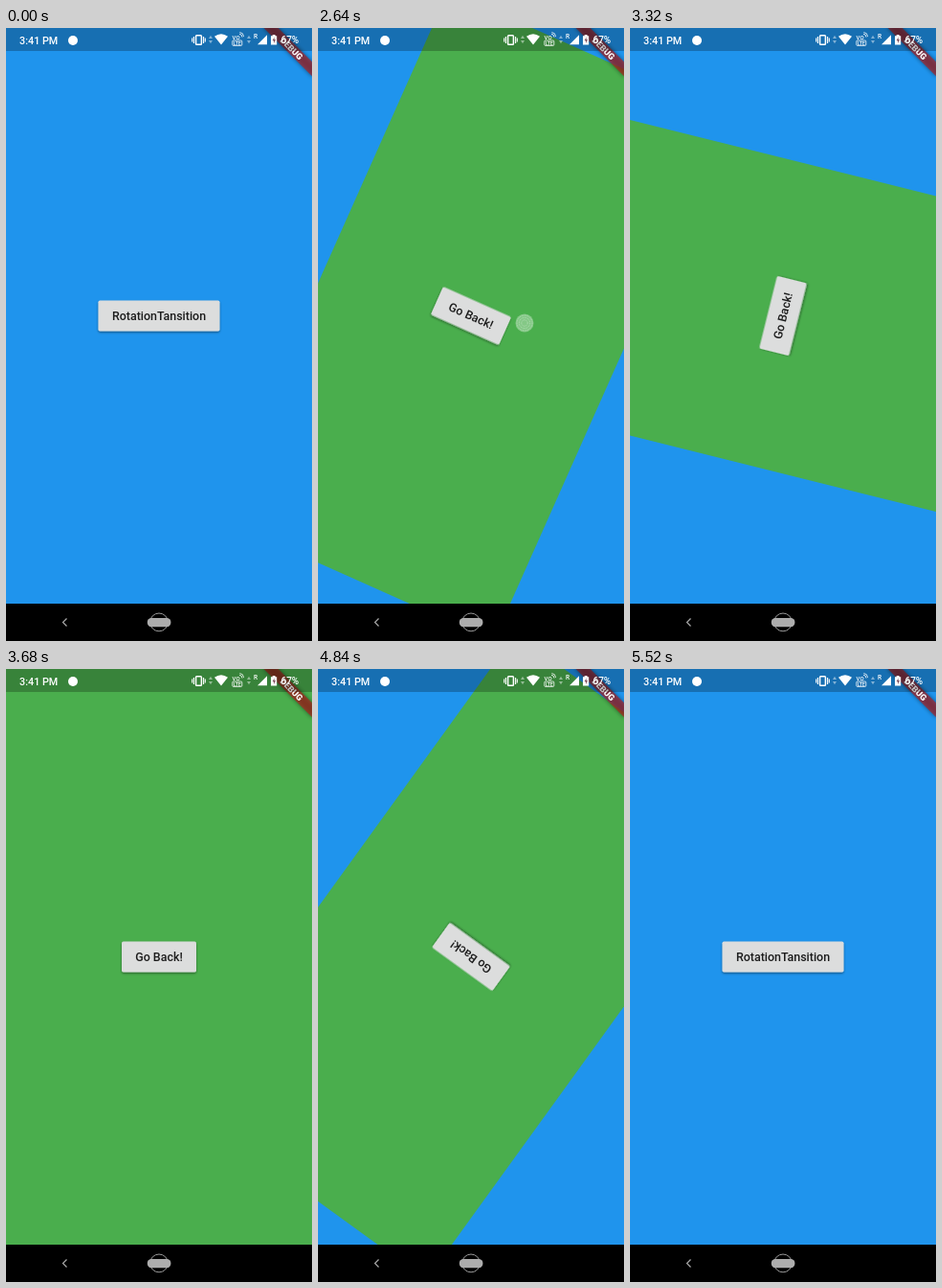
Write an HTML page that moves like this. It is 320x640 px and loops after 5.6 s.

```html
<!DOCTYPE html>
<html lang="en">
<head>
<meta charset="utf-8">
<title>Rotation page transition</title>
<style>
  html, body { margin: 0; width: 100%; height: 100%; overflow: hidden; background: #000; }
  svg { display: block; width: 100vw; height: 100vh; }
  text { font-family: Roboto, sans-serif; font-weight: 500; }
  .label { font-size: 12.44px; fill: #1c1c1c; text-anchor: middle; }
  .face { fill: #dcdddd; }
  .line { fill: none; stroke: #fff; }
</style>
</head>
<body>
<svg viewBox="0 0 320 640">
  <defs>
    <filter id="lift" x="-10%" y="-30%" width="120%" height="170%">
      <feDropShadow dx="0" dy="1.3" stdDeviation="1.1" flood-opacity=".45"/>
    </filter>
    <filter id="soft" x="-20%" y="-60%" width="140%" height="220%">
      <feGaussianBlur stdDeviation="2"/>
    </filter>
    <clipPath id="wideClip"><rect x="96.5" y="284.5" width="127" height="32" rx="1.8"/></clipPath>
    <clipPath id="slimClip"><rect x="121" y="284.5" width="78" height="32" rx="1.8"/></clipPath>
  </defs>

  <!-- first page -->
  <rect width="320" height="601" fill="#1f94ed"/>
  <rect class="face" x="96.5" y="284.5" width="127" height="32" rx="1.8" filter="url(#lift)"/>
  <g clip-path="url(#wideClip)"><circle id="wideSplash" cx="216" cy="308"/></g>
  <text class="label" x="160" y="304.8">RotationTansition</text>

  <!-- second page -->
  <g id="page">
    <rect width="320" height="601" fill="#4aae4d"/>
    <rect class="face" x="121" y="284.5" width="78" height="32" rx="1.8" filter="url(#lift)"/>
    <g clip-path="url(#slimClip)"><circle id="slimSplash" cx="186" cy="308"/></g>
    <text class="label" x="160" y="304.8">Go Back!</text>
  </g>

  <!-- corner banner -->
  <g transform="translate(320 0) rotate(45)">
    <rect x="-36" y="24.9" width="72" height="10.7" opacity=".45" filter="url(#soft)"/>
    <rect x="-36" y="24.9" width="72" height="10.7" fill="#b71c1c" fill-opacity=".63"/>
    <text y="33.5" font-size="9.07" style="font-weight:900" fill="#fff" text-anchor="middle">DEBUG</text>
  </g>

  <!-- status bar -->
  <rect width="320" height="24" opacity=".25"/>
  <g fill="#fff">
    <text x="14" y="16.6" font-size="10.8">3:41 PM</text>
    <circle cx="70" cy="13" r="5"/>
    <rect class="line" x="198.6" y="7.7" width="5.8" height="9.6" rx=".8" stroke-width="1.5"/>
    <path class="line" d="M196.4 9v7M194.7 10.5v4M206.6 9v7M208.3 10.5v4" stroke-width="1.1"/>
    <path d="M218 8.7Q225 3.7 232 8.7L225 17.6Z"/>
    <g id="arrows" opacity=".45">
      <path d="M212 11l2-3.2 2 3.2zM212 13l2 3.2 2-3.2z"/>
      <path d="M252 11l2-3.2 2 3.2zM252 13l2 3.2 2-3.2z"/>
    </g>
    <text x="236.6" y="12" font-size="6">VO</text>
    <path class="line" d="M244 6.2q2.8.2 3 3.4M244.4 4.5q4 .3 4.2 4.6" stroke-width=".8"/>
    <rect class="line" x="236.8" y="13" width="10" height="5.4" rx="1" stroke-width=".8"/>
    <text x="238" y="17.6" font-size="4.8">LTE</text>
    <text x="259" y="11" font-size="6.5">R</text>
    <path d="M263 17.3L273 7.3V17.3Z"/>
    <path d="M277 8.2h1.7V7h2.8v1.2h1.7v9.2H277z"/>
    <path d="M280.6 9.5l-2 3.7h1.4v2.7l2-3.8h-1.4z" fill="#80505f"/>
    <text x="287.5" y="16.3" font-size="10">67%</text>
  </g>

  <!-- navigation bar -->
  <rect y="601" width="320" height="39"/>
  <path class="line" d="M63.5 616.5l-4 4 4 4" style="stroke:#aaa" stroke-width="1.2"/>
  <circle class="line" cx="160" cy="620.4" r="9.4" style="stroke:#999" stroke-width="1"/>
  <rect x="147.8" y="616" width="24.6" height="9.2" rx="4.2" fill="#adadad"/>

  <!-- finger marker -->
  <g id="touch">
    <circle r="9.5" fill="#fff" opacity=".32"/>
    <g class="line" stroke-width=".7" stroke-opacity=".45" stroke-dasharray="1 .7">
      <circle r="8"/><circle r="5.6"/><circle r="3.2"/>
    </g>
  </g>
</svg>
<script>
  const LOOP = 5600, STEP = 40, TURN = 942;
  const PUSH = 2577, POP = 4463;
  const el = id => document.getElementById(id);
  const clamp = v => Math.max(0, Math.min(1, v));
  const taps = [
    { down: 2400, up: PUSH, x: 216, splash: el('wideSplash') },
    { down: 4280, up: POP, x: 186, splash: el('slimSplash') }
  ];

  function draw(t) {
    const turns = clamp((t - PUSH) / TURN) - clamp((t - POP) / TURN);
    el('page').setAttribute('visibility', turns > 0 ? 'visible' : 'hidden');
    el('page').setAttribute('transform', `rotate(${turns * 360} 160 300.5)`);

    let press = 0;
    for (const { down, up, x, splash } of taps) {
      const age = t - down;
      const fade = age < 0 ? 0 : 1 - clamp((t - up) / 200);
      splash.setAttribute('r', Math.max(0, age) * .2);
      splash.setAttribute('opacity', .12 * fade);
      if (age >= 0 && t < up + 100) {
        press = 1;
        el('touch').setAttribute('transform', `translate(${x} 308)`);
      }
    }
    el('touch').setAttribute('opacity', press);
  }

  function tick() {
    const t = performance.now() % LOOP;
    draw(Math.floor(t / STEP) * STEP);
    requestAnimationFrame(tick);
  }
  tick();
</script>
</body>
</html>
```
